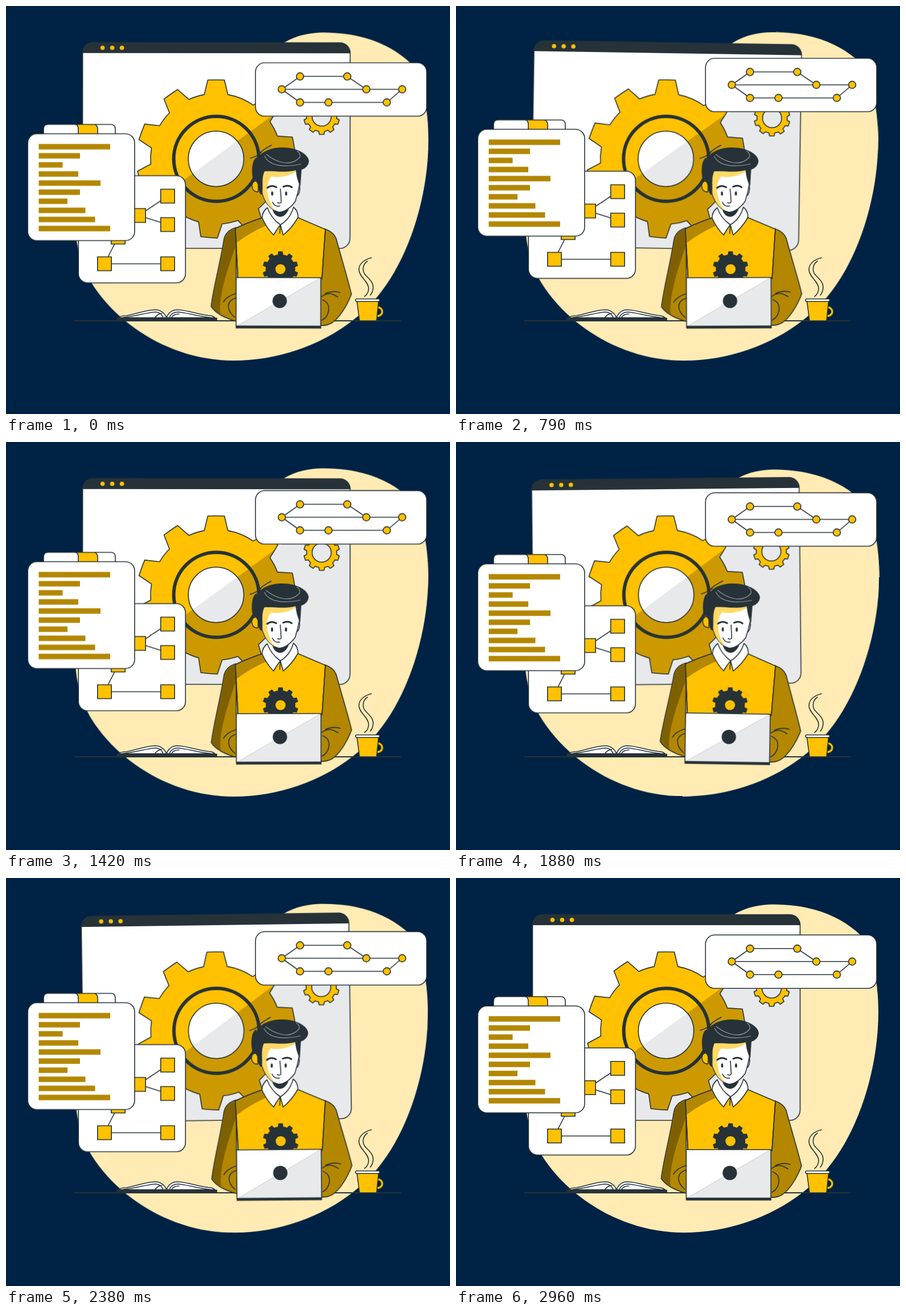
These frames come from a looping animation (780 by 718 pixels, 3000 ms). An HTML page:

```html
<!DOCTYPE html>
<html lang="en">
<head>
<meta charset="utf-8">
<title>Developer at work</title>
<style>
  html, body { margin: 0; width: 100%; height: 100%; overflow: hidden; background: #002244; }
  svg { display: block; width: 780px; height: 718px; }
  .ink { stroke: #263238; stroke-width: 1.6; stroke-linejoin: round; stroke-linecap: round; }
  .line { fill: none; }
  .white { fill: #fff; }
  .gold { fill: #ffc100; }
  .amber { fill: #b38700; }
  .brown { fill: #7f6000; }
  .grey { fill: #e8e9eb; }
  .dark { fill: #263238; }
  .pale { fill: #ffd966; }

  .sway { animation: sway 1.5s linear -40ms infinite; }
  .blob { transform-origin: 432px 335px; }
  .man { transform-origin: 483px 408px; }
  .window { transform-origin: 369.5px 245.5px; animation-duration: 3s; }
  .float { animation: float 3s linear -40ms infinite; }

  @keyframes sway {
    0%, 100% { transform: rotate(0deg); }
    25% { transform: rotate(1deg); }
    75% { transform: rotate(-1deg); }
  }
  @keyframes float {
    0%, 100% { transform: translateY(0); }
    50% { transform: translateY(-15px); }
  }
</style>
</head>
<body>
<svg viewBox="0 0 780 718">
  <defs>
    <clipPath id="half"><path d="M100 462L640 66.600V460H100Z"/></clipPath>
    <clipPath id="frame"><rect x="134.500" y="64.500" width="470" height="362" rx="18"/></clipPath>
  </defs>

  <path class="sway blob" fill="#ffebb3" d="M488 64.500C510 51 535 46.500 557 46.500C630 46.500 678 70 709 99
    C730 122 742 180 742 235C742 335 708 445 652 512C595 580 500 624 400 624
    C290 624 195 560 150 487C135 462 123 425 122 390C121 300 200 260 300 240C400 200 420 105 488 64.500Z"/>

  <g class="sway window">
    <g clip-path="url(#frame)">
      <rect class="white" x="134" y="64" width="471" height="363"/>
      <path class="grey" d="M134 437L605 92.500V427H134Z"/>
      <rect class="dark" x="134" y="64" width="471" height="19"/>
    </g>
    <rect class="ink line" x="134.500" y="64.500" width="470" height="362" rx="18"/>
    <g class="gold">
      <circle cx="169.500" cy="73.800" r="3.800"/>
      <circle cx="186.500" cy="73.800" r="3.800"/>
      <circle cx="203.500" cy="73.800" r="3.800"/>
    </g>
    <path class="gear gold"/>
    <path class="gear" fill="#cc9a00" clip-path="url(#half)"/>
    <path class="gear ink line"/>
    <circle cx="369.500" cy="269" r="74.800" fill="none" stroke="#263238" stroke-width="6"/>
    <circle class="white" cx="369" cy="269" r="48.700"/>
    <circle class="grey" cx="369" cy="269" r="48.700" clip-path="url(#half)"/>
    <circle class="ink line" cx="369" cy="269" r="48.700"/>
    <path id="cog" class="ink gold"/>
    <circle class="ink grey" cx="554.500" cy="194.500" r="16.800"/>
  </g>

  <path d="M120 554H694" stroke="#263238" stroke-width="1.8"/>

  <g class="float">
    <rect class="ink white" x="127.300" y="299" width="188" height="188.500" rx="16"/>
    <path class="ink line" d="M284 385L233 369L284 335M233 369L197 407L173 454H284"/>
    <g id="nodes" class="ink gold"></g>
    <path class="ink white" d="M66 226V216.500Q66 208.800 74 208.800H184Q192 208.800 192 216.500V226Z"/>
    <path class="ink gold" d="M122 208.800Q127 210 127 217V226H161V217Q161 210 155 208.800Z"/>
    <rect class="ink white" x="38.200" y="225.200" width="187.800" height="188" rx="16"/>
    <g id="code" class="amber"></g>
    <rect class="ink white" x="438.300" y="100.300" width="300.700" height="94" rx="16"/>
    <path class="ink line" d="M696 147H484.500L516.500 124.300H599.500L633 147M484.500 147L516.500 170H669L696 147"/>
    <g id="dots" class="ink gold"></g>
  </g>

  <g class="book">
    <path class="ink white" d="M197 548.500Q202 545 212 545C232 541 246 535 262 534.500Q276 535 282 548.500
      Q287 535 301 534.500C318 535 335 542 355 544.500Q364 545 367 548.500Z"/>
    <path class="ink line" d="M206 548C230 546 247 539 263 538.500Q272 539 276 548M262 548Q266 542 274 541
      M358 548C334 546 317 539 301 538.500Q291 539 287 548M291 548Q294 542 304 542"/>
    <rect class="dark" x="194.500" y="548.500" width="176.500" height="5" rx="1"/>
  </g>

  <g class="cup">
    <path d="M652 530.500A7.500 7.500 0 1 1 651 545" fill="none" stroke="#263238" stroke-width="6"/>
    <path d="M652 530.500A7.500 7.500 0 1 1 651 545" fill="none" stroke="#ffc100" stroke-width="3"/>
    <path class="ink gold" d="M616.500 519H654.500L651 554H621Z"/>
    <rect class="ink white" x="614" y="515.500" width="42.500" height="4.500" rx="2.200"/>
    <path class="ink line" d="M642 443C630 446 620 453 620 464C620 476 637 485 637 497Q637 506 630 511
      M635 449C626 455 625 467 632 474C640 482 645 487 645 494Q645 503 640 509"/>
  </g>

  <g class="sway man">
    <path class="ink amber" d="M404 390Q387 395 383 410C377 450 364 498 360.500 529Q372 546 405 555Z"/>
    <path class="brown" d="M402 392Q388 397 384 410C378 450 365 498 361.500 529Q367 537 377 543
      C372 510 394 450 404 421Z"/>
    <path class="ink amber" d="M560 392Q576 398 580 409C590 446 602 485 607 507C598 530 585 550 572 558
      Q563 563 552 562V478Z"/>
    <path class="ink gold" d="M403 391.500Q425 381 452 372H512L561 393L555 480H407.500Z"/>
    <path class="amber" d="M404 392Q425 382 451 373L458 386Q428 399 404.800 417Z"/>
    <path class="ink line" d="M403 391.500Q425 381 452 372M403 391.500L407.500 480M561 393L555 480
      M404 506Q388 511 382 521M404 514Q393 517 391 526Q390 538 402 548
      M555 511Q568 501 583 512M561 506Q575 500 587 504M556 517Q569 522 567 536Q565 548 555 553"/>
    <path id="badge" class="dark"/>
    <circle class="gold" cx="482.200" cy="463" r="8.800"/>

    <path class="white" d="M459 352H506L500 374L482 385L468 376Z"/>
    <path class="ink white" d="M459 355Q450 362 450 373Q458 391 470 403Q475 394 482 385Q466 374 459 355Z"/>
    <path class="ink white" d="M505 354Q513 360 513 372Q502 391 487 403L482 385Q499 375 505 354Z"/>
    <path class="ink line" d="M482 385L481 400"/>

    <path class="ink white" d="M508 318Q516 312 516 322Q515 334 509 335Z"/>
    <path class="ink gold" d="M443 309Q433 306 432 316Q433 328 443 327Z"/>
    <path class="ink white" d="M448 290H517C518 310 512 332 508 344C500 355 489 363 479 363
      C465 359 453 345 449 325Z"/>
    <path class="pale" d="M448.500 286H510V291Q490 304 466 300C454 313 458 343 473 360
      C461 355 453 341 449.500 325Z"/>
    <path class="dark" d="M468 359Q480 366 497 357Q491 371 481 371Q472 370 468 359Z"/>
    <path class="dark" d="M441 270C447 257 463 249 486 249C512 249 531 261 532 273Q531 284 519 288
      L517 318C512 308 510 299 509 289C491 294 470 290 454 291C448 304 452 316 450 332
      Q446 333 444 324C444 311 437 307 433 302C431 287 432 270 441 266Z"/>
    <path class="ink line" d="M429 268Q442 264 448 258M440 264Q450 253 466 245"/>
    <path d="M454 264C463 283 491 284 518 278M457 261C474 275 500 284 516 266Q518 260 511 255" fill="none" stroke="#929a9e" stroke-width="1.200"/>
    <g class="dark">
      <ellipse cx="467.500" cy="330" rx="1.900" ry="3.800"/>
      <ellipse cx="492" cy="330" rx="1.900" ry="3.800"/>
    </g>
    <path class="line" d="M459 320Q466 314 475 319M487 318Q496 314 502 319" stroke="#263238" stroke-width="3" stroke-linecap="round"/>
    <path class="ink line" d="M482 322L483.500 345Q482 348 477 346M468 345Q472 354 481 352"/>

    <rect class="white" x="404.500" y="478" width="148.700" height="87"/>
    <path class="grey" d="M553 478V564H404.500Z"/>
    <path d="M553 478L404.500 564" stroke="#bfc2c5" stroke-width=".8"/>
    <rect class="ink line" x="404.500" y="478" width="148.700" height="87"/>
    <rect class="dark" x="404" y="562.500" width="150" height="5"/>
    <circle class="dark" cx="481" cy="519" r="12.600"/>
  </g>
</svg>
<script>
  const $ = id => document.getElementById(id);

  // Angles run clockwise from straight up, in degrees.
  function gear(cx, cy, tip, root, angles, tipHalf, rootHalf) {
    const at = (r, deg) => {
      const a = deg * Math.PI / 180;
      return (cx + r * Math.sin(a)).toFixed(2) + ' ' + (cy - r * Math.cos(a)).toFixed(2);
    };
    return angles.map((a, i) =>
      (i ? `A${root} ${root} 0 0 1 ` : 'M') + at(root, a - rootHalf) +
      'L' + at(tip, a - tipHalf) +
      `A${tip * 3} ${tip * 3} 0 0 1 ` + at(tip, a + tipHalf) +
      'L' + at(root, a + rootHalf)
    ).join('') + `A${root} ${root} 0 0 1 ` + at(root, angles[0] - rootHalf) + 'Z';
  }

  const teeth = (n, step, start = 0) => Array.from({ length: n }, (_, i) => start + i * step);

  const big = gear(369, 269, 139.5, 115, teeth(10, 35, 45), 6, 10.4);
  document.querySelectorAll('.gear').forEach(p => p.setAttribute('d', big));
  $('cog').setAttribute('d', gear(554.5, 194.5, 31.5, 26.5, teeth(10, 36), 7.5, 11));
  $('badge').setAttribute('d', gear(482.2, 463, 31.5, 26, teeth(10, 36), 7, 10.5));

  $('nodes').innerHTML = [[284, 335], [284, 385], [284, 454], [173, 454], [233, 369], [197, 407]]
    .map(([x, y]) => `<rect x="${x - 12.2}" y="${y - 12.2}" width="24.4" height="24.4"/>`).join('');

  $('dots').innerHTML = [[516.5, 124.3], [599.5, 124.3], [484.5, 147], [633, 147],
    [696, 147], [516.5, 170], [566.5, 170], [669, 170]]
    .map(([x, y]) => `<circle cx="${x}" cy="${y}" r="6.4"/>`).join('');

  $('code').innerHTML = [125.5, 72.5, 42, 69.5, 108.5, 72.5, 50.5, 82, 99, 125.5]
    .map((w, i) => `<rect x="57.5" y="${243.2 + 16 * i}" width="${w}" height="9.6"/>`).join('');
</script>
</body>
</html>
```
